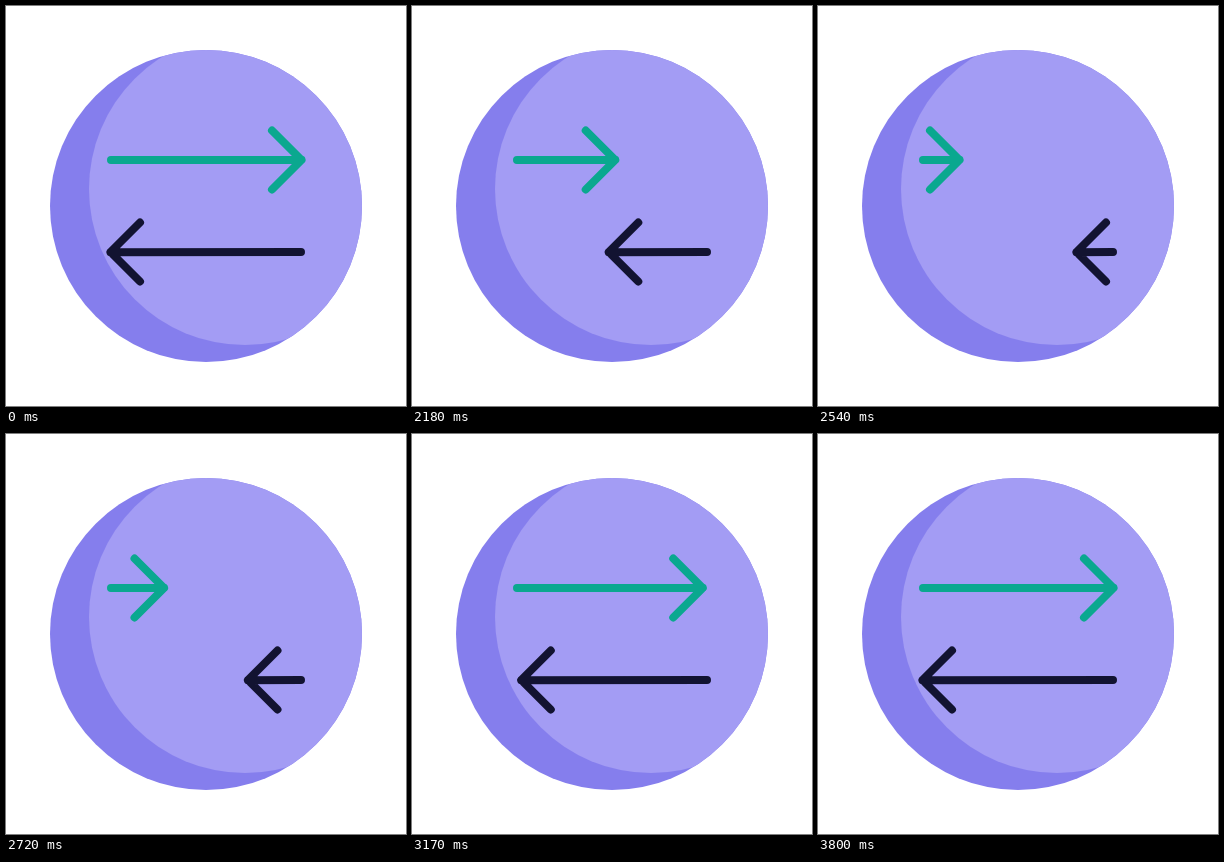
Animation of 400x400 px, one loop 3.83 s. Source, as an HTML page:

```html
<!DOCTYPE html>
<html lang="en">
<head>
<meta charset="utf-8">
<title>Two-way arrows</title>
<style>
  html, body { margin: 0; width: 100%; height: 100%; overflow: hidden; background: #fff; }
  svg { display: block; width: 100vw; height: 100vh; }
  .arrow { fill: none; stroke-width: 8; stroke-linecap: round; stroke-linejoin: round; }
</style>
</head>
<body>
<svg viewBox="0 0 400 400">
  <clipPath id="disc"><circle cx="200" cy="200" r="156"/></clipPath>
  <circle cx="200" cy="200" r="156" fill="#857eed"/>
  <circle cx="239" cy="183" r="156" fill="#a39cf4" clip-path="url(#disc)"/>
  <path class="arrow" stroke="#0aa88f"/>
  <path class="arrow" stroke="#121331" transform="rotate(180 200 200)"/>
</svg>
<script>
  const LOOP = 3830, STEP = 30, START = 2000;
  const arrows = document.querySelectorAll('.arrow');

  // Each entry: step, tip offset, easing used to reach it
  const keys = [
    [0, 0],
    [18.3, -154, [0.3, 0.5, 0.4, 1]],
    [30.3, 0, [1, 0, 0.8, 1]],
    [35, -7, [0.3, 0, 0.6, 1]],
    [46, 1, [0.4, 0, 0.6, 1]],
    [60, 0, [0.4, 0, 0.6, 1]]
  ];

  const cubic = (a, b, t) => 3 * a * t * (1 - t) ** 2 + 3 * b * t * t * (1 - t) + t ** 3;

  function ease([x1, y1, x2, y2], x) {
    let lo = 0, hi = 1;
    for (let i = 0; i < 24; i++) {
      const mid = (lo + hi) / 2;
      if (cubic(x1, x2, mid) < x) lo = mid; else hi = mid;
    }
    return cubic(y1, y2, lo);
  }

  function offsetAt(step) {
    const i = keys.findIndex(key => step <= key[0]);
    if (i < 1) return 0;
    const [from, a] = keys[i - 1], [to, b, curve] = keys[i];
    return a + (b - a) * ease(curve, (step - from) / (to - from));
  }

  function draw(time) {
    const step = Math.max(0, Math.floor((time % LOOP - START) / STEP));
    const tip = 295.5 + offsetAt(step);
    const path = `M105 154L${tip} 153.7M${tip - 29.5} 124.5L${tip} 154L${tip - 29.5} 183.5`;
    arrows.forEach(arrow => arrow.setAttribute('d', path));
  }

  const begin = performance.now();
  function tick() {
    draw(performance.now() - begin);
    requestAnimationFrame(tick);
  }
  tick();
</script>
</body>
</html>
```
